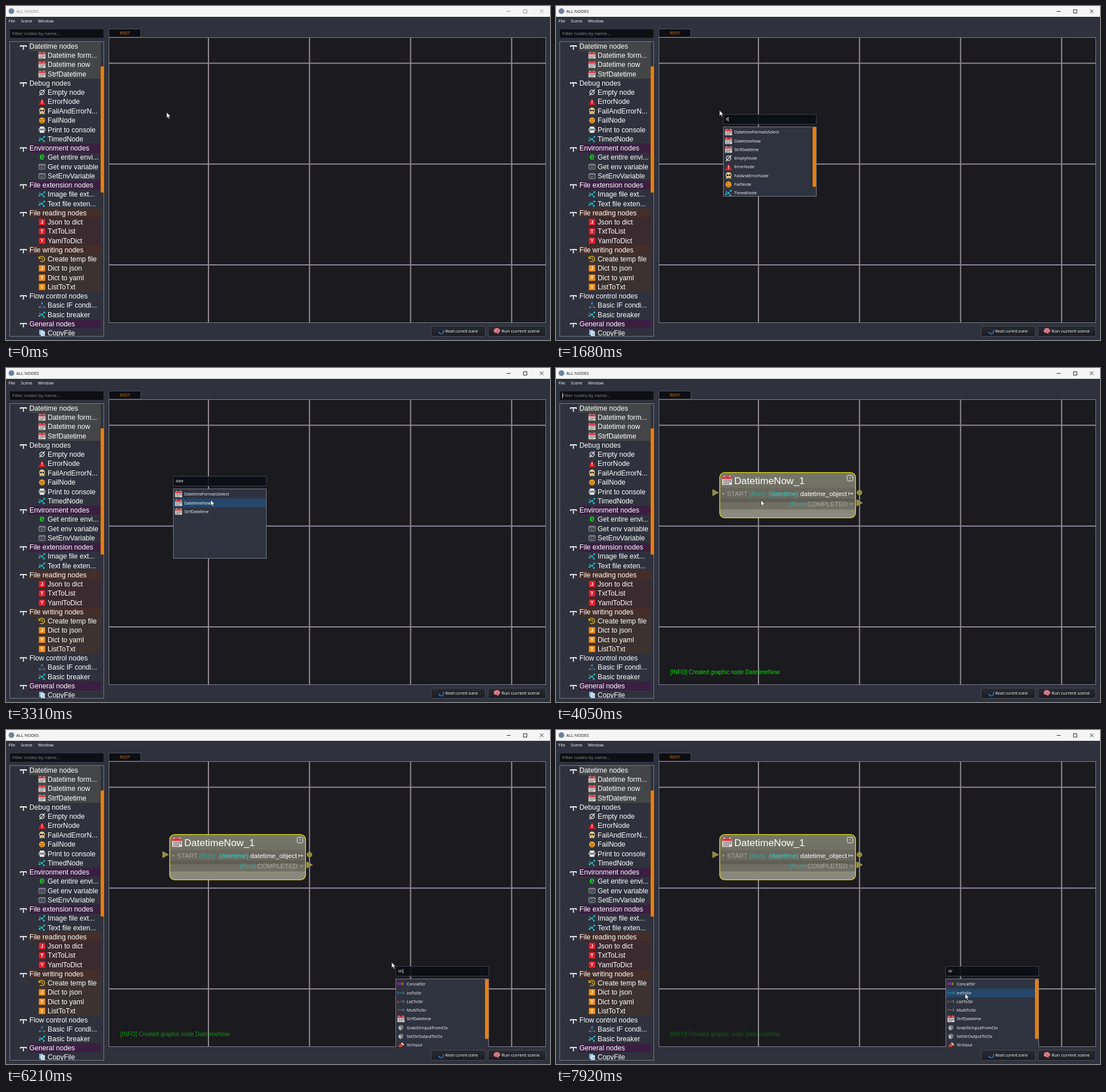
Recreate the animation shown at these times as an HTML page. Size 954 by 587 pixels, loop 8 s.

```html
<!DOCTYPE html>
<html lang="en">
<head>
<meta charset="utf-8">
<title>All nodes</title>
<style>
  html, body { margin: 0; width: 100%; height: 100%; overflow: hidden; background: #2f323d; }
  svg { display: block; width: 954px; height: 587px; }
  text { font-family: "Open Sans", "Noto Sans", sans-serif; white-space: pre; }
  .arial { font-family: "Liberation Sans", Arial, sans-serif; }
  #bar { color: #8a8a8a; }
  #bar.active { color: #141414; }
</style>
</head>
<body>
<svg id="stage" viewBox="0 0 954 587" xmlns="http://www.w3.org/2000/svg"></svg>
<script>
const LOOP = 8000, ROW = 15.3;
const stage = document.getElementById('stage');

// Drawing helpers, each returns markup
const rect = (x, y, w, h, fill, more = '') =>
  `<rect x="${x}" y="${y}" width="${w}" height="${h}" fill="${fill}" ${more}/>`;
const path = (d, stroke, width = 1, fill = 'none') =>
  `<path d="${d}" stroke="${stroke}" stroke-width="${width}" fill="${fill}"/>`;
const dot = (x, y, r, fill) => `<circle cx="${x}" cy="${y}" r="${r}" fill="${fill}"/>`;
const text = (x, mid, str, size, fill = '#fff', more = '') =>
  `<text x="${x}" y="${mid + size * .36}" font-size="${size}" fill="${fill}" ${more}>${str}</text>`;
const arial = (x, mid, str, size, fill, more = '') =>
  text(x, mid, str, size, fill, 'class="arial" ' + more);
const at = (x, y, body, scale = 1) =>
  `<g transform="translate(${x} ${y}) scale(${scale})">${body}</g>`;
const box = (x, y, w, h, fill, stroke, more = '') =>
  rect(x + .5, y + .5, w - 1, h - 1, fill, `stroke="${stroke}" ${more}`);

// Icons, centred on 0,0 and about 12 px wide
const letter = (ch, fill) => rect(-5.5, -5.5, 11, 11, fill, 'rx=".6"') +
  arial(0, 0, ch, 8.5, '#fff', 'font-weight="bold" text-anchor="middle"');
const cast = (str, from, to) => text(-6, -.4, str, 5.8, from, 'font-weight="bold"') +
  text(2.6, -.4, 'S', 5.8, to, 'font-weight="bold"');
const icons = {
  cal: rect(-6, -5, 12, 10.5, '#f0e6e4') + rect(-6, -5, 12, 3.2, '#d6303c') +
    path('M-4.5-.3H5M-4.5 1.8H5M-4.5 3.9H3', '#4a4a52', 1.2) +
    path('M-2.6-1.5V5M0-1.5V5M2.6-1.5V5', '#f0e6e4', .8) + path('M-3.5-6V-4M3.5-6V-4', '#eee', 1),
  empty: '<circle r="4" fill="none" stroke="#eee" stroke-width="1.2"/>' + path('M-4.5 5.2L5-5.4', '#eee', 1.2),
  error: path('M0-5L5.5 5H-5.5Z', '#e01822', 1, '#e01822') + rect(-.6, -2.4, 1.2, 4, '#fff') + dot(0, 3.3, .8, '#fff'),
  skull: path('M-4.5 3L4.5 5M4.5 3L-4.5 5', '#d9c48c', 1.1) + dot(0, -1, 5, '#ecd596') +
    dot(-2.1, -.8, 1.8, '#30281f') + dot(2.1, -.8, 1.8, '#30281f') + rect(-1.8, 2.6, 3.6, 2.2, '#e0c888') +
    path('M-.6 2.8V4.8M.7 2.8V4.8', '#4a3c30', .6),
  fail: dot(0, 0, 5.2, '#f2a12c') + dot(-2, -1, .9, '#4b2b0b') + dot(2, -1, .9, '#4b2b0b') +
    path('M-2.5 3.2Q0 .4 2.5 3.2', '#4b2b0b', 1),
  print: rect(-4, -5.5, 8, 4, '#eee') + rect(-6, -2.5, 12, 5, '#a9adb3') + rect(-4, 1, 8, 4.5, '#e9e9ec') +
    path('M-5 .4H5', '#50545c', 1.2),
  graph: path('M-4 2L0 0 4-4M0 0L3 4M-4-2L0 0', '#1fb9c6', 1) + dot(-4.4, 2, 1.5, '#25cbd8') +
    dot(4, -4, 1.5, '#25cbd8') + dot(3.2, 4, 1.5, '#25cbd8') + dot(0, 0, 1.6, '#25cbd8') + dot(-4, -2, 1, '#25cbd8'),
  e: arial(0, -1.4, 'e', 16, '#12d81c', 'font-weight="bold" text-anchor="middle"'),
  env: rect(-5.5, -4.5, 11, 9, '#3b3f49', 'stroke="#9a9da6" rx="1"') + path('M-5.5-2.8H5.5', '#9a9da6') +
    text(0, .9, 'x=', 5, '#9fb8a4', 'text-anchor="middle"'),
  redJ: letter('J', '#e3202e'), redT: letter('T', '#e3202e'), redY: letter('Y', '#e3202e'),
  orJ: letter('J', '#f08f1e'), orY: letter('Y', '#f08f1e'), orT: letter('T', '#f08f1e'),
  clock: path('M-4.6-1.8A4.8 4.8 0 1 1-3.4 3.6', '#e5c326', 1.3) + path('M-5.5-4.5V-1H-2', '#e5c326', 1.2) +
    path('M0-2.8V.4L2.4 1.8', '#e5c326', 1.1),
  branch: path('M0-3L-4 3.5M0-3L4 3.5', '#4a627e', .8) + dot(0, -3.8, 1.7, '#4b7fae') +
    dot(-4, 3.5, 1.7, '#4b7fae') + dot(4, 3.5, 1.7, '#5f6f86') + dot(0, 3.5, 1, '#4b7fae'),
  copy: rect(-5, -5.5, 7, 9, '#8fb9d8') + rect(-2, -3, 7, 9, '#e2eef7') + path('M-.6 0H3.8M-.6 2H3.8M-.6 4H3.8', '#6ba0c8', .8),
  sss: ['#d43ce0', '#b73cf0', '#e0c030'].map((c, i) => text(i * 3.7 - 6, -.4, 'S', 6, c, 'font-weight="bold"')).join(''),
  int: cast('I-&gt;', '#38a8c8', '#28c8b8'), list: cast('L-&gt;', '#e0584c', '#28c8b8'),
  multi: cast('*-&gt;', '#e0584c', '#28c8b8'),
  cube: path('M-4-3L0-5.2 4.5-3.6V2.4L0 5-4 2.6Z', '#2a2b2f', .6, '#777b80') +
    path('M-4-3L0-1.2V5L-4 2.6Z', 'none', 0, '#b9bcc0'),
  input: path('M-5 2L1-4 5 0-1 5Z', '#7e2420', .5, '#c9483e') + path('M1-4L5 0', '#ecd9cc', 2)
};
const icon = (name, x, y, scale) => at(x, y, icons[name], scale);

// Sidebar: title, header tint, row tint, rows of icon and label
const groups = [
  ['Datetime nodes', '#434547', '#434547', 'cal:Datetime form...', 'cal:Datetime now', 'cal:StrfDatetime'],
  ['Debug nodes', '', '', 'empty:Empty node', 'error:ErrorNode', 'skull:FailAndErrorN...', 'fail:FailNode', 'print:Print to console', 'graph:TimedNode'],
  ['Environment nodes', '#3a1f42', '', 'e:Get entire envi...', 'env:Get env variable', 'env:SetEnvVariable'],
  ['File extension nodes', '#3a1f42', '', 'graph:Image file ext...', 'graph:Text file exten...'],
  ['File reading nodes', '#452e29', '#3b2a30', 'redJ:Json to dict', 'redT:TxtToList', 'redY:YamlToDict'],
  ['File writing nodes', '#452e29', '#3c322f', 'clock:Create temp file', 'orJ:Dict to json', 'orY:Dict to yaml', 'orT:ListToTxt'],
  ['Flow control nodes', '', '', 'branch:Basic IF condi...', 'graph:Basic breaker'],
  ['General nodes', '#3a1f42', '', 'copy:CopyFile']
];
function sidebar() {
  const HEAD = 15.8, ITEM = 16.4;
  let y = 63, out = '';
  for (const [title, headTint, rowTint, ...rows] of groups) {
    if (headTint) out += rect(40, y, 126, HEAD, headTint);
    if (rowTint) out += rect(56, y + HEAD, 110, ITEM * rows.length, rowTint);
    out += path(`M25.5 ${y + 9.2}V${y + 7}H35.5V${y + 9.2}M30.5 ${y + 7}V${y + 14}`, '#f2f2f2', 1.8);
    out += arial(41, y + 7.7, title, 12.2);
    y += HEAD;
    for (const row of rows) {
      const [name, label] = row.split(':');
      out += icon(name, 63.2, y + 8) + arial(73, y + 7.9, label, 12.2);
      y += ITEM;
    }
  }
  return box(6, 62, 166, 519, 'none', '#777b86') + `<g clip-path="url(#side)">${out}</g>` +
    rect(166, 106, 6, 222, '#ec7c08', 'rx="2"');
}

function titleBar() {
  return `<g id="bar">` + rect(0, 0, 954, 19, '#f5f5f5') + dot(9.5, 9, 5, '#6a82a0') +
    text(18, 9.4, 'ALL NODES', 7.5, 'currentColor') +
    path('M878 9.5H885M907.5 6.5H913.5V12.5H907.5ZM936.3 6.2L942.5 12.4M942.5 6.2L936.3 12.4', 'currentColor', .9) + '</g>' +
    text(4.5, 26, 'File', 7.3) + text(26, 26, 'Scene', 7.3) + text(56, 26, 'Window', 7.3);
}

function canvas() {
  let out = rect(180, 55, 766, 501, '#1b1a1f');
  for (let i = 0; i < 4; i++) out += rect(354 + i * 177.25, 55, 2, 501, '#948d97');
  for (let i = 0; i < 3; i++) out += rect(180, 99.6 + i * 177.2, 766, 2, '#8e889a');
  return out + box(180, 55, 767, 502, 'none', '#7d7f8a');
}

function buttons() {
  const brain = path('M-5.5 1Q-6-4-1-5 5-5 5.5 0 5 3 2 3L3 5.5 1 5 0 3Q-5 4-5.5 1Z', '#9c3f4c', .6, '#e88b94') +
    path('M-3.5-1.5Q-1-4 0-1.5T3.5-2M-3 1.2Q0-.5 3 1', '#9c3f4c', .8);
  const swirl = path('M4.2-1A4.2 4.2 0 0 1-4 2', '#2b86dc', 2) + path('M4 1.5A3.8 3.8 0 0 1-1.5 4', '#1b55a8', 1.4);
  return box(745, 562, 96, 19, 'url(#btn)', '#4a4d57', 'rx="1.5"') + box(845, 562, 102, 19, 'url(#btn)', '#4a4d57', 'rx="1.5"') +
    at(763, 571, swirl) + text(770.5, 571.4, 'Reset current scene', 6.2) +
    at(861, 571, brain) + text(869, 571.3, 'Run current scene', 7.9);
}

function node() {
  const port = 'stroke="#a3a05c" stroke-width=".8" fill="#918e3e"';
  return `<g id="node"><g clip-path="url(#body)">` + rect(286, 183, 240, 82, 'url(#node-fill)') +
    rect(286, 211, 240, 17, '#64635a', 'opacity=".55"') + rect(286, 228, 240, 8, '#615f55') +
    rect(286, 236, 240, 12.5, '#716f63') + rect(286, 248.5, 240, 16, '#8b897c') +
    path('M287 228H525', '#7b7970', .7) + '</g>' +
    rect(287, 183.6, 238.4, 79.8, 'none', 'rx="9" stroke="#dede12" stroke-width="1.3"') +
    icon('cal', 300, 197.5, 1.42) + arial(312.5, 197.8, 'DatetimeNow_1', 17.4) +
    rect(510.7, 188.5, 10, 10, 'none', 'rx="2" stroke="#eee"') +
    text(515.7, 193.6, '?', 7, '#fff', 'text-anchor="middle"') +
    dot(293.2, 221, 1.4, '#a8a79e') + arial(299.8, 221.3, 'START', 11.3, '#a8a79e') +
    arial(338.6, 221.3, '(Run)', 11.3, '#37a79c') + arial(373.3, 221.3, '(datetime)', 11.6, '#10e6de') +
    arial(428.3, 221.3, 'datetime_object', 11.6) +
    path('M513.5 218.2V223.4M513.5 220.8H520.5M518.3 218.8L520.5 220.8 518.3 222.8', '#eee', 1) +
    arial(410, 239, '(Run)', 11.3, '#37a79c') + arial(440.7, 239, 'COMPLETED', 11.4, '#a8a79e') +
    dot(518, 239, 1.4, '#a8a79e') +
    `<path d="M274.8 213.5L285 219 274.8 224.5ZM527.3 231.5L537.5 237 527.3 242.5Z" ${port}/>` +
    `<circle cx="532.2" cy="219" r="4.4" ${port}/></g>`;
}

// Cursor stops: time, x, y
const stops = [
  [0, 281.7, 187], [90, 286.4, 183.4], [370, 286.8, 183.4],
  [2780, 299.5, 189.3], [2870, 312, 205], [2960, 334, 239], [3040, 349, 268],
  [3130, 357, 265], [3220, 360, 249], [3310, 359, 232], [3590, 359.5, 232.3],
  [4140, 368, 235], [4230, 398, 247], [4320, 452, 276], [4410, 522, 318],
  [4500, 592, 360], [4590, 642, 391], [4680, 668, 405], [4770, 676.3, 408.3],
  [6660, 677, 406], [6750, 679, 404.5], [6840, 681, 404.5],
  [7020, 684, 406], [7110, 690, 412], [7200, 698, 424], [7290, 706, 438],
  [7380, 712, 451], [7470, 716, 460], [7560, 717.5, 463], [7650, 717.5, 463.3]
];
const latest = (keys, t) => keys.findLast(k => k[0] <= t);

const dates = ['cal:DatetimeFormatsSelect', 'cal:DatetimeNow', 'cal:StrfDatetime'];
const withD = [...dates, 'empty:EmptyNode', 'error:ErrorNode', 'skull:FailAndErrorNode', 'fail:FailNode', 'graph:TimedNode'];
const strings = ['sss:ConcatStr', 'int:IntToStr', 'list:ListToStr', 'multi:MultiToStr', 'cal:StrfDatetime',
  'cube:GrabStrInputFromCtx', 'cube:SetStrOutputToCtx', 'input:StrInput'];

// typed: time, text, matching classes
const popups = [
  { x: 293, y: 190, end: 4050, click: 3870, caret: [[650, 1], [1210, 0], [1680, 1], [2780, 0]],
    typed: [[650, '', []], [1680, 'd', withD], [1860, 'da', dates], [2130, 'dat', dates], [2220, 'date', dates]] },
  { x: 683, y: 415, end: LOOP, click: LOOP, caret: [[5310, 1], [6660, 0]],
    typed: [[5310, '', []], [5850, 's', strings], [5940, 'st', strings], [6120, 'str', strings]] }
];

function popupMarkup({ x, y }, i) {
  return `<g id="pop${i}" clip-path="url(#view)">` +
    box(x, y, 164, 18, '#0c0e15', '#3b3e49', 'fill-opacity=".88"') +
    `<text class="query" x="${x + 4.8}" y="${y + 11.2}" font-size="6.3"></text>` +
    rect(0, y + 5, .8, 8, '#fff', 'class="caret"') +
    box(x, y + 22, 164, 123, '#2f333f', '#777b86') +
    `<g clip-path="url(#list${i})">` + rect(x + 1, 0, 162, ROW, '#24476a', 'class="hover"') +
    '<g class="items"></g></g></g>';
}

function drawPopup(p, i, t, cx, cy) {
  const root = document.getElementById('pop' + i), find = c => root.querySelector('.' + c);
  const state = latest(p.typed, t);
  const open = state && t < p.end;
  root.style.display = open ? '' : 'none';
  if (!open) return;
  const [, str, items] = state, top = p.y + 24, long = items.length > 7;
  const query = find('query');
  if (p.state !== state) {
    p.state = state;
    query.textContent = str || 'Search for a class...';
    query.setAttribute('fill', str ? '#fff' : '#85878c');
    find('items').innerHTML = items.map((item, n) => {
      const [name, label] = item.split(':'), mid = top + ROW * (n + .5);
      return icon(name, p.x + 9.6, mid) + text(p.x + 19.8, mid, label, 7.2);
    }).join('') + (long ? rect(p.x + 157, p.y + 23, 6, 105, '#ec7c08', 'rx="2"') : '');
    find('caret').setAttribute('x', p.x + 4.8 + (str ? query.getComputedTextLength() : 0));
  }
  find('caret').style.display = latest(p.caret, t)[1] ? '' : 'none';
  const row = Math.floor((cy - top) / ROW), hover = find('hover');
  const over = cx > p.x && cx < p.x + 156 && row >= 0 && row < items.length;
  hover.style.display = over ? '' : 'none';
  hover.setAttribute('y', top + ROW * row);
  hover.setAttribute('width', long ? 156 : 162);
  hover.setAttribute('fill', t >= p.click ? '#2b587f' : '#24476a');
}

const clip = (id, x, y, w, h, r = 0) => `<clipPath id="${id}">${rect(x, y, w, h, '#000', `rx="${r}"`)}</clipPath>`;
const grad = (id, a, b) => `<linearGradient id="${id}" x2="0" y2="1"><stop stop-color="${a}"/><stop offset="1" stop-color="${b}"/></linearGradient>`;

stage.innerHTML = '<defs>' + clip('side', 7, 63, 164, 517) + clip('view', 180, 55, 767, 502) +
  clip('body', 287, 183.6, 238.4, 79.8, 9) + popups.map((p, i) => clip('list' + i, p.x + 1, p.y + 23, 162, 121)).join('') +
  grad('btn', '#292b32', '#1b1d23') + grad('node-fill', '#77766a', '#66655a') + '</defs>' +
  rect(0, 0, 954, 587, '#2f323d') + titleBar() +
  box(6, 40, 166, 17, '#0d0f15', '#343742') + text(11, 48.6, 'Filter nodes by name...', 8, '#8d8f94') +
  rect(11, 43.5, .8, 10, '#fff', 'id="filter-caret"') + sidebar() +
  box(180, 40, 57, 15, '#0d0e13', '#4d505a') + text(208.5, 47.6, 'ROOT', 6.5, '#ec7c08', 'text-anchor="middle"') +
  canvas() + node() + arial(200.3, 534.4, '[INFO] Created graphic node DatetimeNow', 10.05, '#00e400', 'id="info"') +
  popups.map(popupMarkup).join('') + buttons() +
  '<path id="cursor" d="M0 0V9.8L2.3 7.7 3.9 11.4 5.5 10.7 3.9 7.1H7Z" fill="#fff" stroke="#111" stroke-width=".6"/>';

const [bar, nodeEl, info, filterCaret, cursor] =
  ['bar', 'node', 'info', 'filter-caret', 'cursor'].map(id => document.getElementById(id));
const show = (el, on) => { el.style.display = on ? '' : 'none'; };

function draw(t) {
  const [, cx, cy] = latest(stops, t);
  cursor.setAttribute('transform', `translate(${cx} ${cy})`);
  bar.classList.toggle('active', t >= 370);
  show(nodeEl, t >= 4050);
  show(info, t >= 4050);
  info.setAttribute('opacity', 1 - .072 * Math.round(Math.max(0, t - 4050) / 450));
  show(filterCaret, t >= 4050 && t < 4590);
  popups.forEach((p, i) => drawPopup(p, i, t, cx, cy));
}

const start = performance.now();
function tick() {
  draw((performance.now() - start) % LOOP);
  requestAnimationFrame(tick);
}
tick();
</script>
</body>
</html>
```
